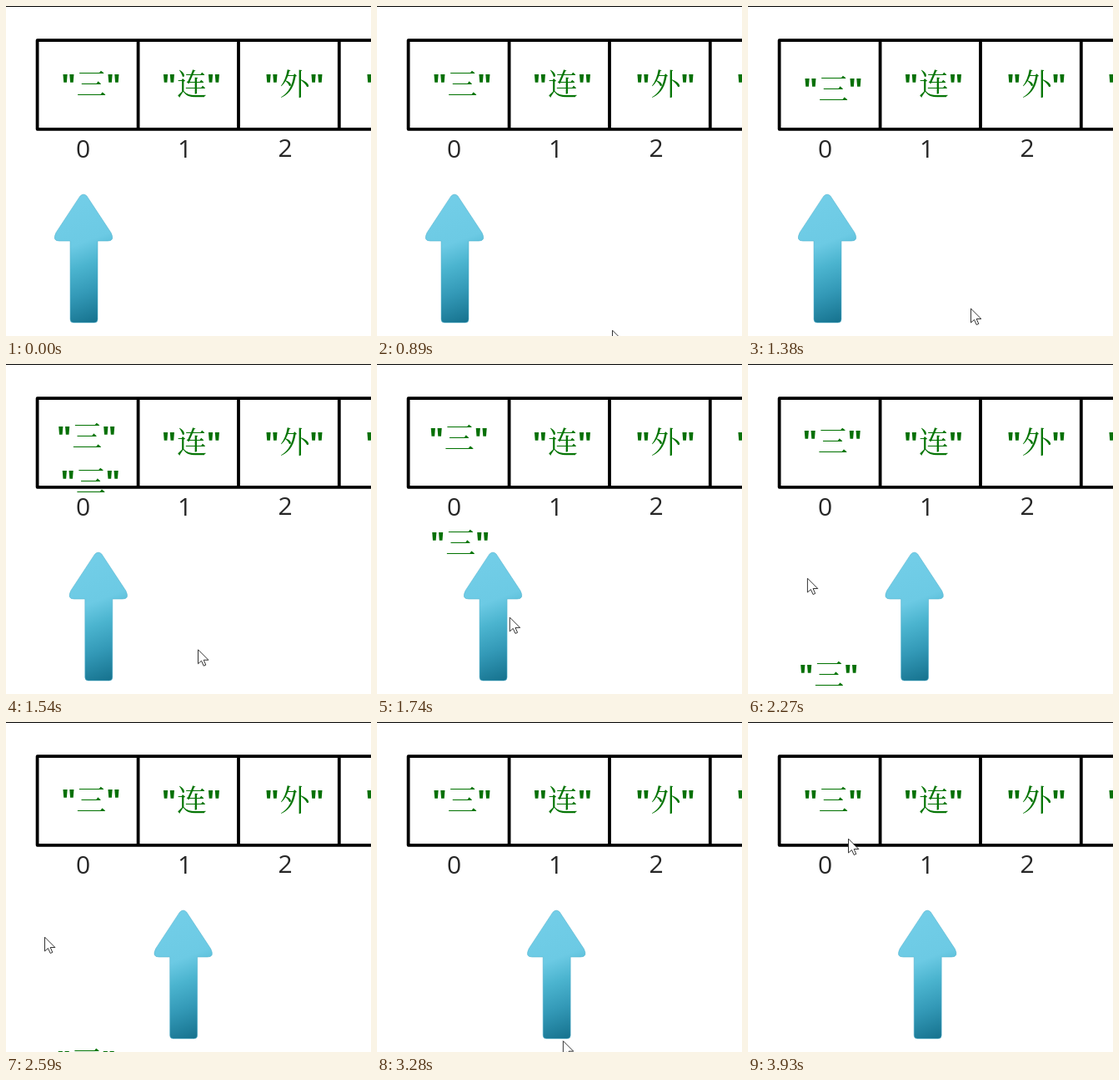
Recreate the animation shown at these times as an HTML page with a canvas. Size 438 by 396 pixels, loop 4.01 s.

```html
<!DOCTYPE html>
<html lang="zh">
<head>
<meta charset="utf-8">
<style>
  html, body { margin: 0; width: 100%; height: 100%; overflow: hidden; background: #fff; }
  canvas { display: block; }
</style>
</head>
<body>
<canvas id="stage" width="438" height="396"></canvas>
<script>
const ctx = document.getElementById('stage').getContext('2d');
const LOOP = 4010, MOVE_START = 1300, COPY_APPEARS = 1400, CURSOR_APPEARS = 890;

const progressKeys = [[1300, 0], [1380, .016], [1740, .376], [2270, .872], [2590, .979], [2800, 1]];
const cursorKeys = [
  [890, 282, 390], [1050, 267, 364], [1380, 267, 364], [1740, 159, 305], [2270, 71, 258],
  [2590, 46, 259], [2880, 420, 397], [3200, 232, 410], [3280, 223, 384], [3930, 120, 141]
];

// Monotone cubic interpolation of one column of a key list
function follow(keys, t, col = 1) {
  const last = keys.length - 1;
  if (t <= keys[0][0]) return keys[0][col];
  if (t >= keys[last][0]) return keys[last][col];
  const i = keys.findIndex(k => k[0] > t) - 1;
  const slope = j => (keys[j + 1][col] - keys[j][col]) / (keys[j + 1][0] - keys[j][0]);
  const tangent = j => {
    if (j === 0 || j === last) return 0;
    const a = slope(j - 1), b = slope(j);
    return a * b <= 0 ? 0 : 2 * a * b / (a + b);
  };
  const span = keys[i + 1][0] - keys[i][0], u = (t - keys[i][0]) / span, v = 1 - u;
  return v * v * (1 + 2 * u) * keys[i][col] + u * u * (3 - 2 * u) * keys[i + 1][col]
    + span * u * v * (v * tangent(i) - u * tangent(i + 1));
}

function label(text, x, y, font, color) {
  ctx.font = font;
  ctx.fillStyle = color;
  ctx.fillText(text, x, y);
}

function quoted(char, x, y) {
  const quoteFont = 'bold 38px "Open Sans", "Noto Sans", sans-serif';
  label('"', x - 27, y + 14.5, quoteFont, '#067006');
  label('"', x + 27, y + 14.5, quoteFont, '#067006');
  label(char, x + .5, y + 13.3, '500 36px "Noto Serif CJK SC", "Noto Sans CJK SC", serif', '#067506');
}

const gridLines = new Path2D('M37.6 41.2H440M37.6 147.8H440' +
  [37.6, 158.6, 279, 399.8].map(x => `M${x} 41.2V147.8`).join(''));

function drawGrid() {
  ctx.fillStyle = '#000';
  ctx.fillRect(0, 0, 438, 1);
  ctx.strokeStyle = '#000';
  ctx.lineWidth = 3.8;
  ctx.stroke(gridLines);
  [[92.5, 182], [214.5, 182], [335, 181]].forEach(([x, y], i) =>
    label(i, x, y, '30px "Open Sans", "Noto Sans", sans-serif', '#262626'));
  quoted('连', 222.5, 94);
  quoted('外', 346, 94);
  quoted('', 467, 94);
}

const arrowShape = new Path2D(`M-4 3 Q0 -1 4 3 L33 47 Q38 57 29 57 H17 V151
  Q17 155 13 155 H-12 Q-16 155 -16 151 V57 H-29 Q-38 57 -33 47Z`);
const arrowFill = ctx.createLinearGradient(-25, 5, 30, 150);
[[0, '#73cee8'], [.38, '#6ccae4'], [.55, '#4bb4cf'], [.75, '#3399b7'], [1, '#15718d']]
  .forEach(stop => arrowFill.addColorStop(...stop));
const cursorShape = new Path2D('M0 0V16.5L4 13L6.7 19L9.3 17.9L6.7 12H12Z');

function drawShape(shape, x, y, fill, stroke) {
  ctx.save();
  ctx.translate(x, y);
  ctx.fillStyle = fill;
  ctx.strokeStyle = stroke;
  ctx.lineWidth = 1;
  ctx.fill(shape);
  ctx.stroke(shape);
  ctx.restore();
}

function draw(t) {
  const p = follow(progressKeys, t);
  ctx.fillStyle = '#fff';
  ctx.fillRect(0, 0, 438, 396);
  drawGrid();
  drawShape(arrowShape, 93 + 122.2 * p, 225, arrowFill, '#4fb0cc88');
  if (t < MOVE_START || t >= COPY_APPEARS) {
    const back = t < MOVE_START ? 0 : 1 - p;
    quoted('三', 102 - 6.2 * back, 94 - 8 * back);
  }
  if (t >= MOVE_START) quoted('三', 102 - 6 * p, 94 + 320 * p);
  if (t >= CURSOR_APPEARS)
    drawShape(cursorShape, follow(cursorKeys, t) + .5, follow(cursorKeys, t, 2) - .5, '#fff', '#333');
}

ctx.textAlign = 'center';
ctx.lineCap = 'round';
const start = performance.now();
function tick() {
  draw((performance.now() - start) % LOOP);
  requestAnimationFrame(tick);
}
tick();
</script>
</body>
</html>
```
